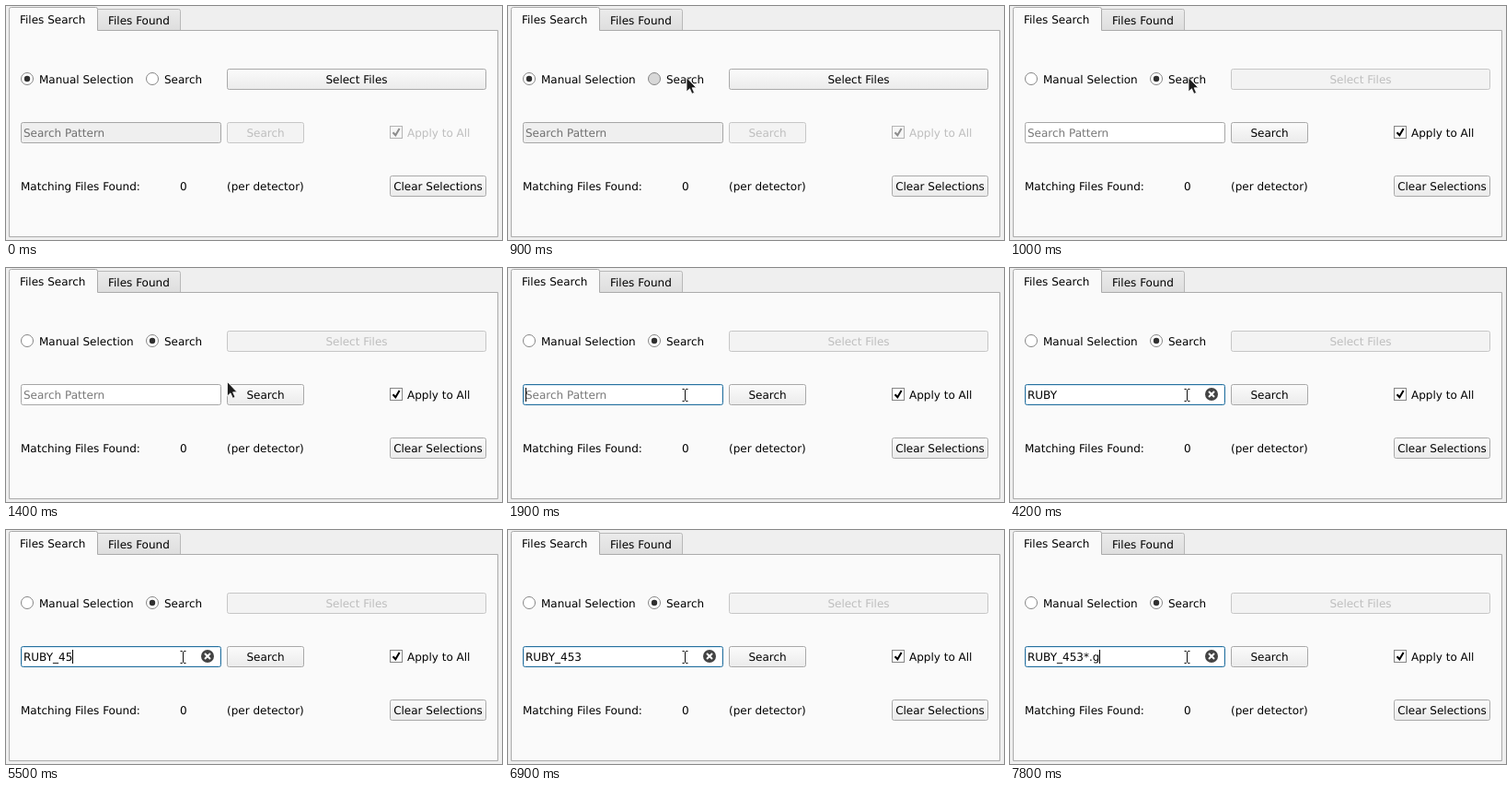
These frames come from a looping animation (539 by 254 pixels, 8 s). An HTML page:

```html
<!DOCTYPE html>
<html lang="en">
<head>
<meta charset="utf-8">
<title>File search form</title>
<style>
html, body { margin: 0; width: 100%; height: 100%; overflow: hidden; background: #efefef; }
svg { display: block; width: 539px; height: 254px; }
text { font: 12px "DejaVu Sans", sans-serif; text-rendering: geometricPrecision; white-space: pre; }
.mid { text-anchor: middle; }
.pane { fill: #fafafa; stroke: #ababab; }
.btn { fill: url(#face); stroke: #a9a9a9; }
.field { fill: #fff; stroke: #a6a6a6; }
.glow { fill: none; stroke: #308cc6; opacity: .18; }
.ring { fill: #fff; stroke: #858585; }
.dot { fill: #303030; }
.hint { fill: #0008; }
.tick { fill: none; stroke: #000; stroke-width: 2; }
.off text { fill: #bebebe; }
.off .btn { fill: #f3f3f3; stroke: #c6c6c6; }
.off .field { fill: #efefef; }
.off .hint { fill: #0008; }
.off .ring { fill: #f6f6f6; stroke: #b4b4b4; }
.off .tick { stroke: #8c8c8c; }
.focus .field { stroke: #26709e; }
.pressed { fill: #d8d8d8; }
</style>
</head>
<body>
<svg viewBox="0 0 539 254">
  <defs>
    <linearGradient id="face" x2="0" y2="1">
      <stop stop-color="#fbfbfb"/><stop offset="1" stop-color="#ebebeb"/>
    </linearGradient>
    <linearGradient id="tab" x2="0" y2="1">
      <stop stop-color="#ebebeb"/><stop offset="1" stop-color="#dedede"/>
    </linearGradient>
  </defs>

  <path d="M99.5 26V3.5H187.5Q189.5 3.5 189.5 5.5V26" fill="url(#tab)" stroke="#b8b8b8"/>
  <path class="pane" d="M3.5 250.5V3.5Q3.5 1.5 5.5 1.5H97.5Q99.5 1.5 99.5 3.5V26.5H534.5V250.5Z"/>
  <text x="15" y="19">Files Search</text>
  <text x="111" y="20">Files Found</text>

  <circle class="ring" cx="23" cy="79" r="6.5"/>
  <circle class="dot" id="manualDot" cx="23" cy="79" r="3.2"/>
  <text x="36" y="84">Manual Selection</text>
  <circle class="ring" id="searchRing" cx="159" cy="79" r="6.5"/>
  <circle class="dot" id="searchDot" cx="159" cy="79" r="3.2"/>
  <text x="172" y="84">Search</text>

  <g id="manualPart">
    <rect class="btn" x="240.5" y="68.5" width="281" height="22" rx="2"/>
    <text class="mid" x="381" y="84">Select Files</text>
  </g>

  <g id="searchPart">
    <rect class="field" x="16.5" y="126.5" width="217" height="22" rx="2"/>
    <rect class="glow" id="glow" x="17.5" y="127.5" width="215" height="20" rx="1"/>
    <text class="hint" id="hint" x="19" y="142">Search Pattern</text>
    <rect class="btn" x="240.5" y="126.5" width="83" height="22" rx="2"/>
    <text class="mid" x="282" y="142">Search</text>
    <rect class="ring" x="417.5" y="130.5" width="13" height="13"/>
    <path class="tick" d="M420.5 137.3L423.3 140.3L427.6 133"/>
    <text x="436" y="142">Apply to All</text>
  </g>
  <text id="typed" x="19" y="142"></text>
  <rect id="caret" y="130" width="1" height="15"/>
  <g id="clear">
    <circle cx="219" cy="137" r="7" fill="#444"/>
    <path d="M216 134l6 6m0-6l-6 6" stroke="#fff" stroke-width="2"/>
  </g>

  <text x="16" y="200">Matching Files Found:</text>
  <text x="189" y="200">0</text>
  <text x="240" y="200">(per detector)</text>
  <rect class="btn" x="417.5" y="184.5" width="104" height="22" rx="2"/>
  <text class="mid" x="469.5" y="200">Clear Selections</text>

  <path id="arrow" d="M.5 .5V16L4 12.8L6.4 18.3L9 17.2L6.6 11.8H11.2Z" fill="#1c1c1c" stroke="#fff" stroke-width=".8"/>
  <g id="beam" fill="none">
    <path id="beamShape" d="M-3 -6.5H-1L0 -5.5L1 -6.5H3M-3 6.5H-1L0 5.5L1 6.5H3M0 -5.5V5.5" stroke="#fff" stroke-width="2.6"/>
    <path d="M-3 -6.5H-1L0 -5.5L1 -6.5H3M-3 6.5H-1L0 5.5L1 6.5H3M0 -5.5V5.5" stroke="#111"/>
  </g>
</svg>
<script>
const LOOP = 8000, PRESS = 900, SWITCH = 1000, FOCUS = 1900, TYPE = 2800;

// [time, pointer, x, y]
const pointer = [
  [500, 'arrow', 210, 19], [600, 'arrow', 193.5, 77], [1300, 'arrow', 284, 104],
  [1400, 'arrow', 240, 123], [1500, 'beam', 214.5, 133], [1600, 'beam', 198.5, 137],
  [1700, 'beam', 192.5, 138],
];
// [time, number of typed letters, caret x or 0 while it is blinked off]
const word = 'RUBY_453*.g';
const typing = [
  [1900, 0, 19], [2400, 0, 0], [2800, 1, 27], [3100, 2, 36], [3300, 3, 44], [3500, 4, 51],
  [4200, 4, 0], [4400, 5, 57], [5000, 5, 0], [5200, 6, 65], [5500, 7, 72], [6100, 7, 0],
  [6300, 8, 80], [6900, 8, 0], [7100, 9, 86], [7400, 10, 90], [7800, 11, 97],
];

const $ = id => document.getElementById(id);
const show = (id, on) => $(id).setAttribute('visibility', on ? 'visible' : 'hidden');
const latest = (keys, t) => keys.findLast(key => key[0] <= t) || [0, 0, 0];

function draw(t) {
  const searching = t >= SWITCH;
  show('manualDot', !searching);
  show('searchDot', searching);
  $('searchRing').classList.toggle('pressed', t >= PRESS && !searching);
  $('manualPart').classList.toggle('off', searching);
  $('searchPart').classList.toggle('off', !searching);
  $('searchPart').classList.toggle('focus', t >= FOCUS);
  show('glow', t >= FOCUS);

  const [, count, caretX] = latest(typing, t);
  $('typed').textContent = word.slice(0, count);
  show('hint', !count);
  show('caret', caretX);
  $('caret').setAttribute('x', caretX);
  const fadeStep = Math.floor((t - TYPE) / 100);
  $('clear').setAttribute('opacity', count ? Math.min(1, .3 + .5 * fadeStep) : 0);

  const [, kind, x, y] = latest(pointer, t);
  for (const id of ['arrow', 'beam']) {
    show(id, id === kind);
    if (id === kind) $(id).setAttribute('transform', `translate(${x} ${y})`);
  }
}

const start = performance.now();
function tick() {
  draw((performance.now() - start) % LOOP);
  requestAnimationFrame(tick);
}
tick();
</script>
</body>
</html>
```
